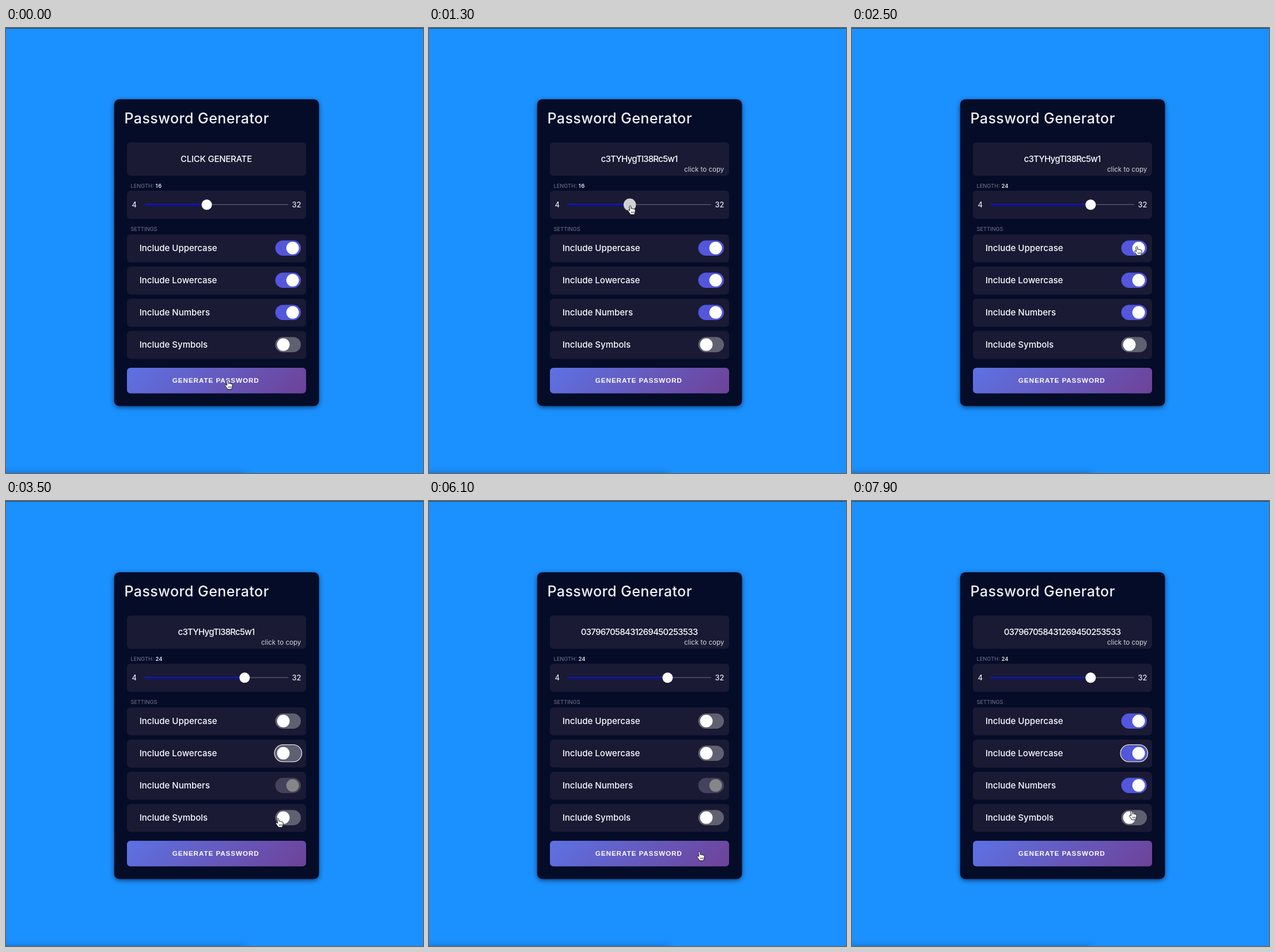
An HTML page for the animation above (8000 ms loop, 724x774 px).

```html
<!DOCTYPE html>
<html lang="en">
<head>
<meta charset="utf-8">
<title>Password Generator</title>
<style>
  html, body { margin: 0; width: 100%; height: 100%; overflow: hidden; background: #1b90ff; }
  svg { display: block; width: 724px; height: 774px; }
  text { font-family: Inter, "Open Sans", sans-serif; font-size: 15px; font-weight: 500; fill: #fbfbff; }
  .title { font-size: 25px; letter-spacing: .42px; fill: #f1f1f8; }
  .mid { text-anchor: middle; }
  .hint { font-size: 11.6px; font-weight: 400; fill: #d6d6df; }
  .label { font-size: 9.3px; font-weight: 400; fill: #77798b; }
  .value { font-size: 9.6px; }
  .limit { font-size: 12.8px; fill: #e6e6ee; }
  .action { font: bold 11.7px "Liberation Sans", Arial, sans-serif; letter-spacing: .92px; fill: #fff; }
  .box { fill: #1a1a35; }
  .ring { fill: none; stroke: #c6c6d2; stroke-width: 1.8; }
</style>
</head>
<body>
<svg viewBox="0 0 724 774">
  <defs>
    <linearGradient id="violet" gradientUnits="userSpaceOnUse" x1="276.6" y1="524.3" x2="454.4" y2="702.1">
      <stop offset="0" stop-color="#5d72e4"/>
      <stop offset="1" stop-color="#6e4298"/>
    </linearGradient>
    <filter id="soft" x="-20%" y="-20%" width="140%" height="140%"><feGaussianBlur stdDeviation="4"/></filter>
    <filter id="dock" x="-20%" y="-200%" width="140%" height="500%"><feGaussianBlur stdDeviation="7"/></filter>
  </defs>

  <rect width="724" height="774" fill="#1b90ff"/>
  <rect x="-40" y="777" width="455" height="24" fill="#04264c" opacity=".5" filter="url(#dock)"/>
  <rect width="724" height="1" fill="#303a48"/>

  <rect x="188" y="126.5" width="355" height="533" rx="9" fill="#000" opacity=".6" filter="url(#soft)"/>
  <rect x="187.8" y="123.9" width="355.6" height="533.5" rx="9" fill="#050c28"/>
  <text class="title" x="205.5" y="166">Password Generator</text>

  <rect class="box" x="210" y="199" width="311" height="58" rx="6"/>
  <text class="mid" id="result" x="365" y="232.7"></text>
  <text class="hint" id="hint" x="443" y="250">click to copy</text>

  <text class="label" x="216.5" y="278">LENGTH:</text>
  <text class="value" id="count" x="259.5" y="278"></text>
  <rect class="box" x="210" y="283" width="311" height="49" rx="6"/>
  <text class="limit" x="218.5" y="312">4</text>
  <text class="limit" x="496.5" y="312">32</text>
  <rect x="241" y="306.3" width="249" height="1.8" rx=".9" fill="#4b4b62"/>
  <rect id="fill" x="241" y="306.6" height="2.6" rx="1" fill="#0d0db4"/>
  <circle id="thumb" cy="307.3"/>

  <text class="label" x="216.5" y="353.4">SETTINGS</text>
  <g id="rows"></g>

  <rect x="210" y="591" width="311" height="44.5" rx="6" fill="url(#violet)"/>
  <text class="action" x="288.8" y="616.8">GENERATE PASSWORD</text>

  <g id="hand" stroke="#111" stroke-width="1" stroke-linejoin="round">
    <path fill="#fff" d="M-4.2-6.4C-4.2-8.4-1.6-8.4-1.4-6.4L-.9-2.6C-.4-3.8 1.4-3.6 1.6-2.2
      C2.2-3.2 3.7-2.9 3.9-1.6C4.7-2.4 6.1-1.8 6.1-.4C6.4 3 5.2 4.4 4.7 7.6H-2.2
      C-2.8 5.4-5.4 3.4-6.3 1.2C-6.9-.2-5.3-1.2-4.2-.2L-3.4.7Z"/>
    <path fill="none" stroke-width=".8" d="M-.4 2.2V5.2M1.6 2.2V5.2M3.6 2.2V5.2"/>
  </g>
</svg>

<script>
const LOOP = 8000, STEP = 100;
const OFF = [95, 97, 113], ON = [82, 87, 220], WHITE = [255, 255, 255];
const LOCKED = [68, 66, 93], LOCKED_KNOB = [134, 134, 136];
const GENERATE = 400, REGENERATE = 4300;

const $ = id => document.getElementById(id);
const clamp = v => Math.max(0, Math.min(1, v));
const smooth = v => v * v * (3 - 2 * v);
const lerp = (a, b, k) => a + (b - a) * k;
const mix = (a, b, k) => `rgb(${a.map((v, i) => Math.round(lerp(v, b[i], k)))})`;
const ramp = (t, start, length) => smooth(clamp((t - start) / length));
const within = (t, a, b) => t >= a && t < b;

// time, x, y
const path = [
  [0, 387, 621], [500, 387, 621], [1100, 352, 317], [1300, 352, 317],
  [2000, 418, 317], [2100, 418, 317], [2500, 497, 388], [2700, 497, 388],
  [3000, 494, 440], [3100, 493, 444], [3500, 475, 560], [3600, 475, 560],
  [4200, 447, 618], [4800, 447, 618], [5300, 498, 498], [5400, 498, 498],
  [5600, 500, 508], [5700, 500, 508], [6100, 472, 618], [6600, 481, 396],
  [7100, 481, 398], [7500, 488, 444], [7600, 488, 444], [7900, 488, 547]
];

function cursorAt(t) {
  const i = path.findIndex(p => p[0] > t);
  if (i < 0) return path[path.length - 1].slice(1);
  const [t0, x0, y0] = path[i - 1], [t1, x1, y1] = path[i];
  const k = ramp(t, t0, t1 - t0);
  return [lerp(x0, x1, k), lerp(y0, y1, k)];
}

const toggles = ["Uppercase", "Lowercase", "Numbers", "Symbols"].map((name, i) => {
  const g = document.createElementNS("http://www.w3.org/2000/svg", "g");
  g.setAttribute("transform", `translate(0 ${359 + i * 56})`);
  g.innerHTML = `<rect class="box" x="210" width="311" height="48.5" rx="6"/>
    <text x="231.7" y="29.2">Include ${name}</text>
    <rect class="track" x="467.5" y="10.5" width="44.5" height="26.5" rx="13.25"/>
    <circle class="knob" cy="23.7" r="10.9"/>
    <rect class="ring" x="466.3" y="9.2" width="47" height="29.1" rx="14.5"/>`;
  $("rows").append(g);
  const part = c => g.querySelector("." + c);
  return { track: part("track"), knob: part("knob"), ring: part("ring") };
});

function setToggle(i, on, ring = false, lock = 0) {
  const { track, knob, ring: edge } = toggles[i];
  track.setAttribute("fill", lock ? mix(ON, LOCKED, lock) : mix(OFF, ON, on));
  knob.setAttribute("fill", mix(WHITE, LOCKED_KNOB, lock));
  knob.setAttribute("cx", lerp(481.5, 497.6, on));
  edge.setAttribute("visibility", ring ? "visible" : "hidden");
}

function draw(t) {
  const made = t >= GENERATE;
  $("result").textContent = !made ? "CLICK GENERATE"
    : t < REGENERATE ? "c3TYHygTl38Rc5w1" : "037967058431269450253533";
  $("result").setAttribute("letter-spacing", made ? -.75 : -.25);
  $("hint").setAttribute("visibility", made ? "visible" : "hidden");

  const count = Math.round(lerp(16, 24, ramp(t, 1300, 700)));
  const x = 250 + (count - 4) * 8.214;
  const held = within(t, 1200, 2100);
  $("count").textContent = count;
  $("count").setAttribute("letter-spacing", count < 20 ? .8 : 0);
  $("fill").setAttribute("width", x - 241);
  $("thumb").setAttribute("cx", x);
  $("thumb").setAttribute("r", held ? 10.8 : 9);
  $("thumb").setAttribute("fill", held ? "#d0d0d2" : "#fff");

  setToggle(0, 1 - ramp(t, 2650, 250) + ramp(t, 6920, 250),
    within(t, 2700, 3000) || within(t, 6900, 7600));
  setToggle(1, 1 - ramp(t, 2950, 250) + ramp(t, 7550, 250),
    within(t, 3000, REGENERATE) || t >= 7600);
  setToggle(2, 1, false, ramp(t, 2950, 250) - ramp(t, 6920, 250));
  setToggle(3, 0);

  $("hand").setAttribute("transform", `translate(${cursorAt(t)})`);
}

function tick() {
  const t = performance.now() % LOOP;
  draw(Math.floor(t / STEP) * STEP);
  requestAnimationFrame(tick);
}
tick();
</script>
</body>
</html>
```
